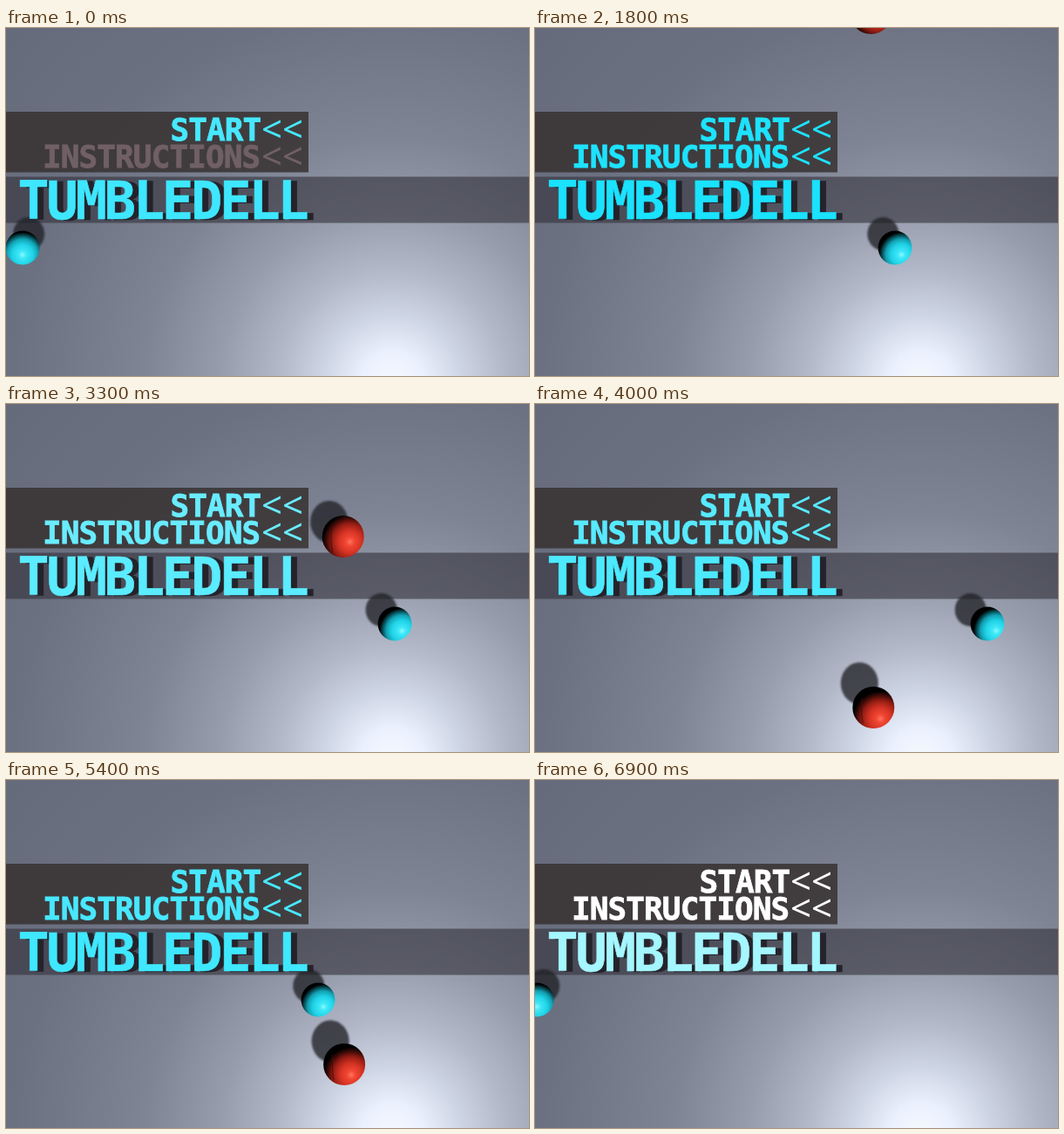
An HTML page that plays this animation: 600 by 399 pixels, repeating every 7 s.

```html
<!DOCTYPE html>
<html lang="en">
<head>
<meta charset="utf-8">
<style>
html, body { margin: 0; width: 100%; height: 100%; overflow: hidden; background: #6b7080; }
svg { display: block; width: 100vw; height: 100vh; }
text { white-space: pre; fill: currentColor; }
.word { font: bold 36px "DejaVu Sans Mono", monospace; letter-spacing: -0.9px; stroke: currentColor; stroke-width: .8px; }
.arrow { font: 42px "Noto Sans", sans-serif; }
.title { font: bold 60px "DejaVu Sans Mono", monospace; letter-spacing: -3px; stroke: currentColor; stroke-width: .6px; }
</style>
</head>
<body>
<svg viewBox="0 0 600 399" preserveAspectRatio="none">
  <defs>
    <radialGradient id="floor" gradientUnits="userSpaceOnUse" cx="443" cy="408" r="620">
      <stop offset="0" stop-color="#f6faff"/>
      <stop offset=".06" stop-color="#eaf0fd"/>
      <stop offset=".13" stop-color="#cdd4e3"/>
      <stop offset=".21" stop-color="#b2b8c7"/>
      <stop offset=".32" stop-color="#969cab"/>
      <stop offset=".46" stop-color="#7e8494"/>
      <stop offset=".7" stop-color="#6b7181"/>
      <stop offset="1" stop-color="#646a79"/>
    </radialGradient>
    <radialGradient id="cyanSkin" gradientUnits="userSpaceOnUse" r="30">
      <stop offset="0" stop-color="#8df7ff"/>
      <stop offset=".14" stop-color="#3de8f8"/>
      <stop offset=".4" stop-color="#20d2e6"/>
      <stop offset=".6" stop-color="#12a0b2"/>
      <stop offset=".76" stop-color="#064049"/>
      <stop offset=".86" stop-color="#000"/>
    </radialGradient>
    <radialGradient id="redSkin" gradientUnits="userSpaceOnUse" r="36">
      <stop offset="0" stop-color="#ff7460"/>
      <stop offset=".14" stop-color="#f24633"/>
      <stop offset=".36" stop-color="#d43324"/>
      <stop offset=".58" stop-color="#951d13"/>
      <stop offset=".76" stop-color="#380a07"/>
      <stop offset=".88" stop-color="#000"/>
    </radialGradient>
    <filter id="soft" x="-20%" y="-20%" width="140%" height="140%"><feGaussianBlur stdDeviation=".8"/></filter>
  </defs>
  <rect width="600" height="399" fill="url(#floor)"/>
  <rect y="96" width="347" height="69.5" fill="#352f2e" fill-opacity=".82"/>
  <rect y="170.5" width="600" height="53" fill="#35333d" fill-opacity=".62"/>
  <g fill="#202026" fill-opacity=".78" filter="url(#soft)">
    <ellipse id="cyanShade" rx="18" ry="19"/>
    <ellipse id="redShade" rx="21.5" ry="24"/>
  </g>
  <g id="start">
    <text class="word" x="188.5" y="129.3">START</text>
    <text class="arrow" x="293" y="131">&lt;&lt;</text>
  </g>
  <g id="help">
    <text class="word" x="42" y="160.3">INSTRUCTIONS</text>
    <text class="arrow" x="293" y="162">&lt;&lt;</text>
  </g>
  <text class="title" x="20.5" y="219.5" color="#24232b">TUMBLEDELL</text>
  <text class="title" id="title" x="13.5" y="218.8">TUMBLEDELL</text>
  <g id="cyan"><circle r="19.4" fill="url(#cyanSkin)"/></g>
  <g id="red">
    <circle r="24" fill="url(#redSkin)"/>
    <path d="M-13 -11Q-15 2 -12 18" fill="none" stroke="#4a0c08" stroke-width="1.2" stroke-opacity=".7"/>
  </g>
</svg>
<script>
const LOOP = 7000, STEP = 100;
const $ = id => document.getElementById(id);

// [time, position] where each ball turns; speed between them is steady
const cyanPath = [[0, 19], [185, -32], [800, 137], [1800, 413], [2610, 637], [3300, 446],
  [3520, 385], [4000, 519], [4425, 637], [5400, 358], [6792, -28], [7000, 30]];
const redPath = [[0, 484], [800, 260], [1800, -17], [2247, -140], [3300, 152],
  [4000, 348], [4661, 531], [5400, 326], [7000, -118]];

const mix = (a, b, k) => a + (b - a) * k;
const blend = (a, b, k) => a.map((v, i) => mix(v, b[i], k));
const paint = (id, rgb) => $(id).setAttribute("color", `rgb(${rgb.map(Math.round)})`);

function along(path, t) {
  const i = Math.max(1, path.findIndex(p => p[0] > t));
  const [t0, v0] = path[i - 1], [t1, v1] = path[i];
  return mix(v0, v1, (t - t0) / (t1 - t0));
}

function place(name, x, y, lightX, lightY, shadeX, shadeY) {
  $(name).setAttribute("transform", `translate(${x} ${y})`);
  const skin = $(name + "Skin"), shade = $(name + "Shade");
  skin.setAttribute("cx", lightX);
  skin.setAttribute("cy", lightY);
  shade.setAttribute("cx", x + shadeX);
  shade.setAttribute("cy", y + shadeY);
}

// 0 is cyan, 1 is white
function pulse(t) {
  const phase = (t + 250) / 1968 % 1;
  return 1 - Math.abs(1 - 2 * phase);
}

function draw(t) {
  const x = along(cyanPath, t), y = along(redPath, t);
  place("cyan", x, 252, Math.max(0, (x - 100) * 0.024), 8, (155 - x) * 0.053, -16);
  place("red", 385.5 + y * 0.008, y, 8, 6 + (y - 152) * 0.035, -16, -17 - (y - 152) * 0.055);

  const cyan = [8, 224, 255], white = [255, 255, 255];
  const w = pulse(t);
  const menu = blend(cyan, white, w < 0.45 ? w : Math.min(1, 0.45 + (w - 0.45) * 2.2));
  paint("title", blend(cyan, [232, 255, 255], w * 0.95));
  paint("start", menu);
  paint("help", blend([112, 96, 101], menu, Math.min(1, t / 300)));
}

function tick(now) {
  draw(Math.floor(now % LOOP / STEP) * STEP);
  requestAnimationFrame(tick);
}
draw(0);
requestAnimationFrame(tick);
</script>
</body>
</html>
```
